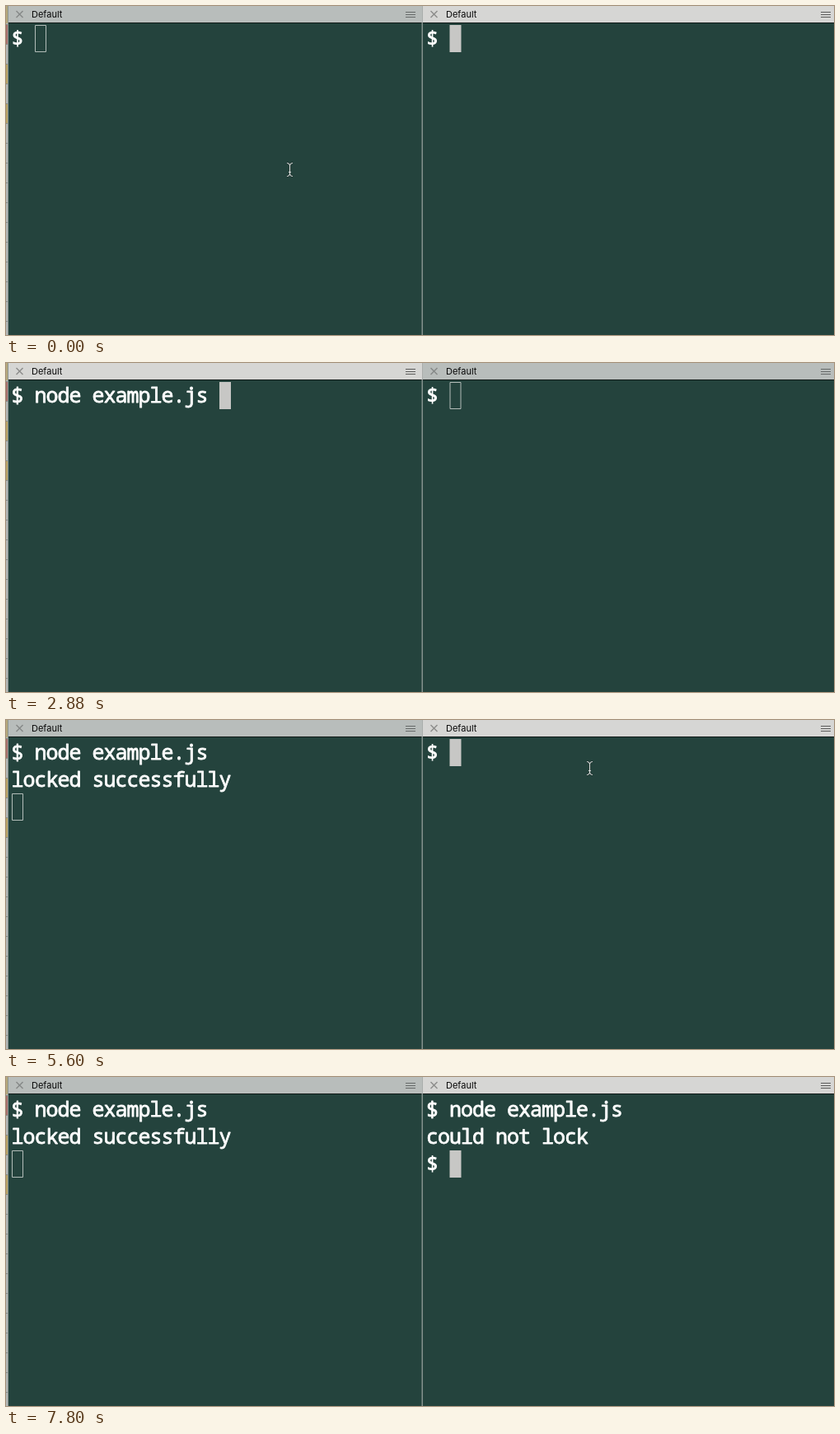
Write an HTML page with a canvas that moves like this. It is 1005 px wide and 399 px high and loops after 8000 ms.

```html
<!DOCTYPE html>
<html lang="en">
<head>
<meta charset="utf-8">
<title>Lock demo</title>
<style>
  html, body { margin: 0; width: 100%; height: 100%; overflow: hidden; background: #24433d; }
  canvas { display: block; }
</style>
</head>
<body>
<canvas id="stage" width="1005" height="399"></canvas>
<script>
const ctx = document.getElementById('stage').getContext('2d');
const LOOP = 8000, CELL = 14, ROW = 33, TOP = 23;
const COMMAND = 'node example.js ';
const FOCUS_LEFT = 720, FOCUS_RIGHT = 5600;

// Keys come in short bursts, then tab completion fills in the rest.
const left = {
  x: 7, edge: 3, end: 505, closeX: 16.5, menuX: 485,
  bursts: [
    { start: 1520, step: 80, count: 3 },
    { start: 1920, step: 200, count: 3 },
    { start: 2520, step: 100, count: 3 }
  ],
  complete: 2880, enter: 4120, answer: 4200, reply: 'locked successfully', exit: Infinity
};
const right = {
  x: 510.5, edge: 506, end: 1005, closeX: 519.5, menuX: 989,
  bursts: [
    { start: 6200, step: 60, count: 3 },
    { start: 6520, step: 100, count: 3 },
    { start: 6880, step: 100, count: 1 }
  ],
  complete: 7160, enter: 7680, answer: 7760, reply: 'could not lock', exit: 7800
};

// The pointer hides as soon as typing starts.
const moves = [
  { show: 0, start: 40, end: 320, hide: 1440, from: [344, 199], to: [297, 176] },
  { show: 4960, start: 4960, end: 5120, hide: 6120, from: [297, 176], to: [708, 59] }
];

const clamp = (v, lo, hi) => Math.min(hi, Math.max(lo, v));
const ease = p => p * p * (3 - 2 * p);

function box(color, x, y, w, h) {
  ctx.fillStyle = color;
  ctx.fillRect(x, y, w, h);
}

function line(...points) {
  ctx.beginPath();
  points.forEach(([x, y], i) => i ? ctx.lineTo(x, y) : ctx.moveTo(x, y));
  ctx.stroke();
}

function drawTab(pane, active) {
  box(active ? '#d6d6d4' : '#b8bdbb', pane.edge, 0, pane.end - pane.edge, 20);
  box('#111a18', pane.edge, 20, pane.end - pane.edge, 1);
  ctx.strokeStyle = active ? '#8c8c8b' : '#858887';
  ctx.lineWidth = 1.4;
  const x = pane.closeX;
  line([x - 4, 6], [x + 4, 14]);
  line([x + 4, 6], [x - 4, 14]);
  ctx.font = '11px Inter, sans-serif';
  ctx.letterSpacing = '0px';
  ctx.fillStyle = '#080808';
  ctx.fillText('Default', x + 14.5, 14);
  for (let i = 0; i < 3; i++) box(active ? '#5c5c5b' : '#656968', pane.menuX, 7 + i * 3, 12, 1);
}

function typedCount(pane, t) {
  if (t >= pane.complete) return COMMAND.length;
  return pane.bursts.reduce((sum, { start, step, count }) =>
    sum + clamp(Math.floor((t - start) / step) + 1, 0, count), 0);
}

function paneRows(pane, t) {
  const rows = ['$ ' + COMMAND.slice(0, typedCount(pane, t))];
  if (t >= pane.enter) rows.push(t >= pane.answer ? pane.reply : '');
  if (t >= pane.answer) rows.push(t >= pane.exit ? '$ ' : '');
  return rows;
}

function drawText(text, x, y) {
  const bold = text === '$ ';
  ctx.font = (bold ? 700 : 400) + ' 25px "Noto Sans Mono", "DejaVu Sans Mono", monospace';
  ctx.letterSpacing = '-1px';
  ctx.fillStyle = ctx.strokeStyle = '#fff';
  ctx.lineWidth = 0.8;
  ctx.lineJoin = 'round';
  ctx.fillText(text, x - 0.5, y);
  if (!bold) ctx.strokeText(text, x - 0.5, y);
}

function drawPane(pane, t, active) {
  const rows = paneRows(pane, t);
  rows.forEach((text, i) => drawText(text, pane.x, TOP + i * ROW + 25));
  const last = rows.length - 1;
  const x = pane.x + rows[last].length * CELL;
  const y = TOP + last * ROW;
  if (active) {
    box('#c7c7c5', x, y, CELL, ROW);
  } else {
    ctx.strokeStyle = '#b3bdb9';
    ctx.lineWidth = 1;
    ctx.strokeRect(x + 0.5, y + 0.5, CELL - 1, ROW - 1);
  }
}

function drawBeam(x, y, color, width) {
  ctx.strokeStyle = color;
  ctx.lineWidth = width;
  line([x, y - 5.5], [x, y + 5.5]);
  line([x - 1.5, y + 3], [x + 1.5, y + 3]);
  for (const s of [-1, 1]) {
    const tip = y + s * 8, bend = y + s * 7.5, stem = y + s * 5.5;
    line([x - 3.5, tip], [x - 1.5, bend], [x, stem], [x + 1.5, bend], [x + 3.5, tip]);
  }
}

function drawPointer(t) {
  const move = moves.find(m => t >= m.show && t < m.hide);
  if (!move) return;
  const snapped = Math.floor(t / 40) * 40;
  const p = ease(clamp((snapped - move.start) / (move.end - move.start), 0, 1));
  const [x, y] = move.from.map((a, i) => Math.round(a + (move.to[i] - a) * p));
  drawBeam(x + 0.5, y - 0.5, '#172c28', 2.6);
  drawBeam(x + 0.5, y - 0.5, '#d5dad8', 1.2);
}

// Sliver of the window behind the terminal.
function drawSliver() {
  box('#b4b7b5', 0, 0, 3, 399);
  box('#b5a77a', 0, 0, 2, 21);
  box('#a86f6a', 0, 22, 2, 24);
  for (const y of [70, 118]) box('#b9a263', 0, y, 2, 24);
  for (let y = 22; y < 399; y += 24) box('#858b88', 0, y, 2, 1);
  box('#8d9693', 2, 0, 1, 399);
}

function draw(t) {
  box('#24433d', 0, 0, 1005, 399);
  drawSliver();
  const leftActive = t >= FOCUS_LEFT && t < FOCUS_RIGHT;
  for (const pane of [left, right]) {
    const active = (pane === left) === leftActive;
    drawTab(pane, active);
    drawPane(pane, t, active);
  }
  box('#a9adab', 505, 0, 1, 20);
  box('#84918d', 504.5, 20, 1.5, 379);
  drawPointer(t);
}

const start = performance.now();
function tick(now) {
  draw(Math.max(0, now - start) % LOOP);
  requestAnimationFrame(tick);
}
draw(0);
requestAnimationFrame(tick);
</script>
</body>
</html>
```
